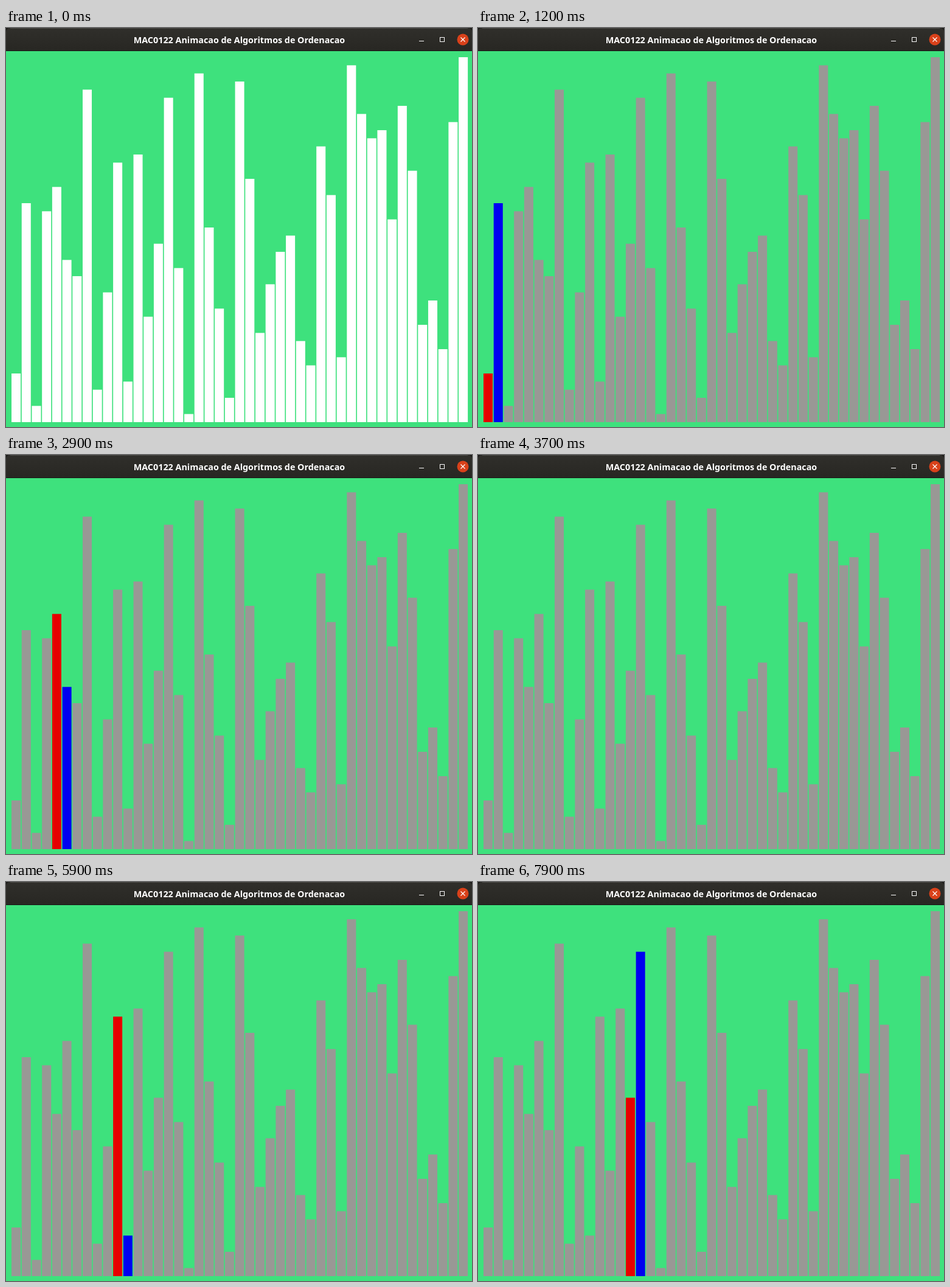
An HTML page that plays this animation: 766 px wide and 656 px high, repeating every 8 s.

```html
<!DOCTYPE html>
<html lang="pt">
<head>
<meta charset="utf-8">
<title>Algoritmos de Ordenacao</title>
<style>
  html, body { margin: 0; width: 100%; height: 100%; overflow: hidden; background: #3ee17d; }
  svg { display: block; }
  text { font: bold 14.33px "Noto Sans", "Open Sans", sans-serif; fill: #fff; text-anchor: middle; }
</style>
</head>
<body>
<svg width="766" height="656" viewBox="0 0 766 656">
  <defs>
    <linearGradient id="bar" x2="0" y2="1">
      <stop offset="0" stop-color="#302f2b"/>
      <stop offset="1" stop-color="#282723"/>
    </linearGradient>
  </defs>
  <rect width="766" height="656" fill="#3ee17d"/>
  <rect width="766" height="38" fill="#191816"/>
  <path d="M0 37V7Q0 0 7 0H759Q766 0 766 7V37Z" fill="url(#bar)"/>
  <path d="M7 .5H759" stroke="#4a4945"/>
  <text x="383.5" y="25">MAC0122 Animacao de Algoritmos de Ordenacao</text>
  <g fill="none" stroke="#fff">
    <path d="M679 21.5H687"/>
    <rect x="713.5" y="15.5" width="7" height="7"/>
    <circle cx="751" cy="19" r="9.5" fill="#d9411a" stroke="none"/>
    <path d="M747.5 15.5l7 7m0 -7l-7 7" stroke-width="1.2"/>
  </g>
  <g id="bars"></g>
</svg>
<script>
const LOOP = 8000, START = 600, STEP = 200, STEPS_PER_PAIR = 5;
const PAUSE_AT = 2800, PAUSE = 100;
const LEFT = 9.05, PITCH = 16.705, WIDTH = 0.9 * PITCH;
const FLOOR = 648, UNIT = 40 / 3;
const WHITE = '#ffffff', GRAY = '#999895', RED = '#e60000', BLUE = '#0000f0';
const values = [
  6, 27, 2, 26, 29, 20, 18, 41, 4, 16, 32, 5, 33, 13, 22,
  40, 19, 1, 43, 24, 14, 3, 42, 30, 11, 17, 21, 23, 10, 7,
  34, 28, 8, 44, 38, 35, 36, 25, 39, 31, 12, 15, 9, 37, 45
];

const group = document.getElementById('bars');
const rects = values.map((_, i) => {
  const rect = document.createElementNS('http://www.w3.org/2000/svg', 'rect');
  rect.setAttribute('x', LEFT + PITCH * i);
  rect.setAttribute('width', WIDTH);
  return group.appendChild(rect);
});

function stepAt(time) {
  const active = time < PAUSE_AT + PAUSE ? Math.min(time, PAUSE_AT - 1) : time - PAUSE;
  return Math.floor((active - START) / STEP);
}

// Neighbouring pairs are compared in turn; each flashes, then settles in order.
function draw(step) {
  const list = values.slice();
  const colors = list.map(() => step < 0 ? WHITE : GRAY);
  if (step > 0) {
    const pair = Math.floor((step - 1) / STEPS_PER_PAIR);
    const phase = (step - 1) % STEPS_PER_PAIR;
    const settled = phase === STEPS_PER_PAIR - 1;
    const sortedPairs = pair + (settled ? 1 : 0);
    for (let p = 0; p < sortedPairs; p++) {
      const a = 2 * p, b = a + 1;
      if (list[a] > list[b]) [list[a], list[b]] = [list[b], list[a]];
    }
    if (!settled) {
      colors[2 * pair] = phase % 2 ? BLUE : RED;
      colors[2 * pair + 1] = phase % 2 ? RED : BLUE;
    }
  }
  rects.forEach((rect, i) => {
    const height = list[i] * UNIT;
    rect.setAttribute('y', FLOOR - height);
    rect.setAttribute('height', height);
    rect.setAttribute('fill', colors[i]);
  });
}

let shown = null, origin = null;
function tick(now) {
  if (origin === null) origin = now;
  const step = stepAt((now - origin) % LOOP);
  if (step !== shown) draw(shown = step);
  requestAnimationFrame(tick);
}
draw(-1);
requestAnimationFrame(tick);
</script>
</body>
</html>
```
